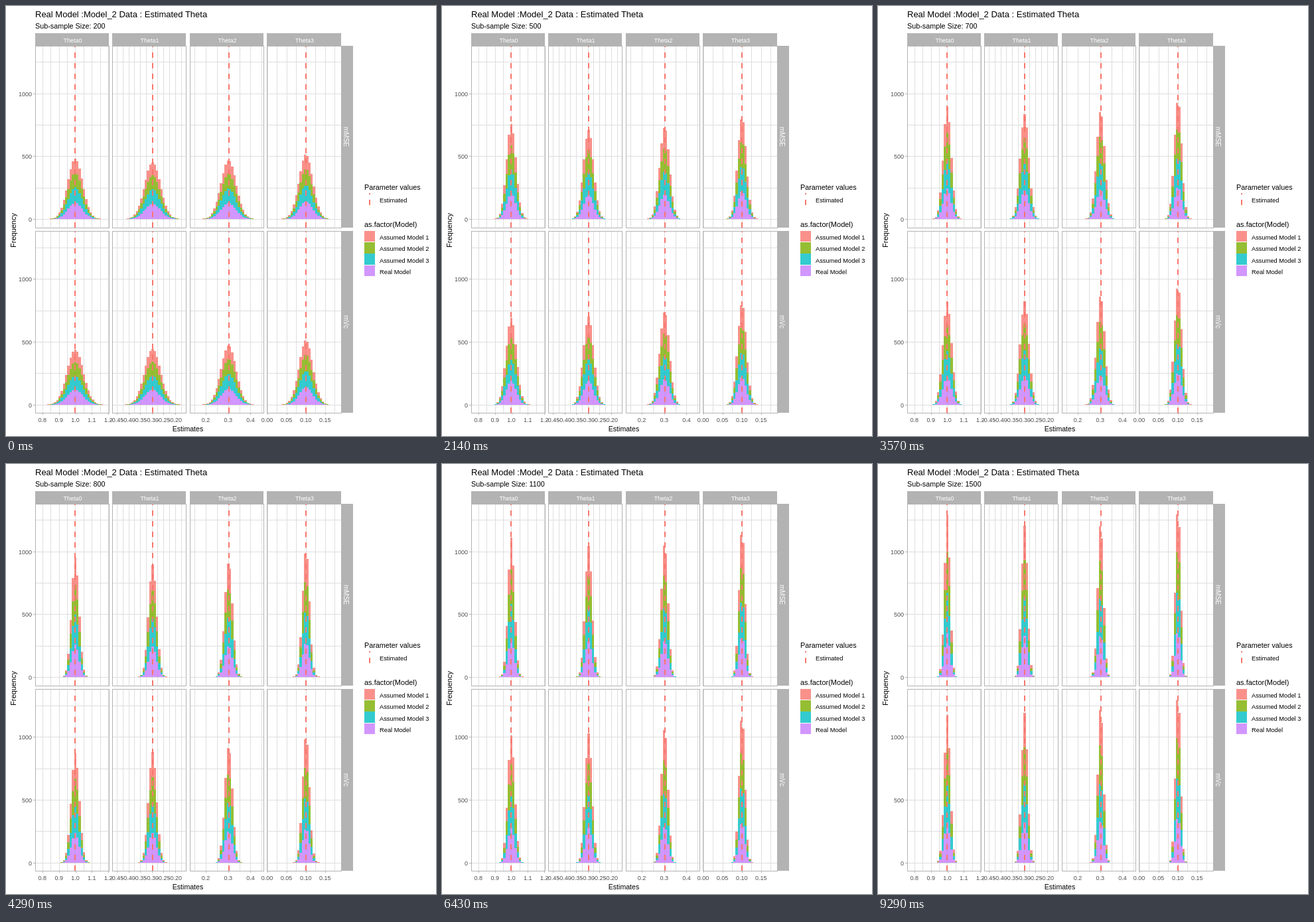
An HTML page that plays this animation: 648x648 px, repeating every 10000 ms.

```html
<!DOCTYPE html>
<html lang="en">
<head>
<meta charset="utf-8">
<title>Estimated Theta</title>
<style>
  html, body { margin: 0; width: 100%; height: 100%; overflow: hidden; background: #fff; }
  svg { display: block; width: 648px; height: 648px; font-family: "Liberation Sans", Arial, sans-serif; }
  rect, line { shape-rendering: crispEdges; }
</style>
</head>
<body>
<svg id="stage" viewBox="0 0 648 648"></svg>
<script>
const LOOP = 10000, STEPS = 14, SAMPLES = 4000;
const BIN = 3.36, UNIT = 0.1893;
const GREY = '#b3b3b3', GRID = '#dedede', LABEL = '#4d4d4d', RED = '#f8766d';
const MODELS = [
  ['Assumed Model 1', RED],
  ['Assumed Model 2', '#7cae00'],
  ['Assumed Model 3', '#00bfc4'],
  ['Real Model', '#c77cff'],
];
const ROWS = [
  { name: 'mMSE', top: 60, bottom: 334, zero: 321.5 },
  { name: 'mVc', top: 339, bottom: 613, zero: 601.05 },
];

// first, gap: pixel position and spacing of the tick labels; from, by: their values.
// edge: any bin edge; spread: sigma * sqrt(sample size), in pixels, for each row.
const PANELS = [
  { first: 54.8, gap: 24.85, from: 0.8, by: 0.1, labels: 5, digits: 1, line: 104, edge: 103, mean: 104.8, spread: [157, 172] },
  { first: 167, gap: 17.55, from: -0.45, by: 0.05, labels: 6, digits: 2, line: 221, edge: 219.7, mean: 221.4, spread: [168, 170] },
  { first: 301, gap: 33.7, from: 0.2, by: 0.1, labels: 3, digits: 1, line: 336, edge: 333, mean: 335.9, spread: [162, 160] },
  { first: 393.5, gap: 29.1, from: 0, by: 0.05, labels: 4, digits: 2, line: 452, edge: 449.5, mean: 452.5, spread: [147, 147] },
];
PANELS.forEach((panel, i) => {
  const left = 44 + 116.57 * i;
  panel.left = Math.floor(left);
  panel.right = Math.floor(left + 111.3);
});

function add(parent, tag, attrs = {}, text = '') {
  const node = document.createElementNS('http://www.w3.org/2000/svg', tag);
  for (const key in attrs) node.setAttribute(key, attrs[key]);
  node.textContent = text;
  parent.appendChild(node);
  return node;
}
const rect = (parent, x, y, width, height, fill, more) =>
  add(parent, 'rect', { x, y, width, height, fill, ...more });
const label = (text, x, y, size, fill = '#000', anchor = 'start', more) =>
  add(front, 'text', { x, y, 'font-size': size, fill, 'text-anchor': anchor, ...more }, text);
const turned = (text, x, y, size, fill, angle) =>
  label(text, 0, 0, size, fill, 'middle', { transform: `translate(${x} ${y}) rotate(${angle})` });
const dashes = (x, bottom, top) =>
  add(front, 'line', { x1: x, x2: x, y1: bottom, y2: top, stroke: RED, 'stroke-width': 2, 'stroke-dasharray': '8 8' });

const stage = document.getElementById('stage');
const back = add(stage, 'g');
const bars = add(stage, 'g', { 'fill-opacity': 0.8 });
const front = add(stage, 'g');

function drawPanel({ left, right, first, gap, line }, { top, bottom, zero }) {
  const width = right - left, height = bottom - top;
  for (let x = first - gap / 2; x < right; x += gap / 2)
    if (x > left) rect(back, Math.round(x), top, 1, height, GRID);
  for (let value = 0; value <= 1250; value += 250)
    rect(back, left, Math.floor(zero - value * UNIT), width, 1, GRID);
  dashes(line, bottom, top);
  rect(front, left + 0.5, top + 0.5, width, height - 0.5, 'none', { stroke: GREY });
}

function drawChart() {
  label('Real Model :Model_2 Data : Estimated Theta', 44, 17, 13);
  label('Estimates', 274, 641, 10.6, '#000', 'middle');
  turned('Frequency', 15, 338, 11, '#000', -90);

  PANELS.forEach((panel, i) => {
    const { left, right, first, gap, from, by, labels, digits } = panel;
    rect(front, left, 41, right - left, 19, GREY);
    label('Theta' + i, (left + right) / 2 + 1, 55, 9, '#fff', 'middle');
    ROWS.forEach(row => drawPanel(panel, row));
    for (let k = 0; k < labels; k++) {
      const x = first + k * gap;
      rect(front, Math.round(x), 613, 1, 3, GREY);
      label((from + k * by).toFixed(digits), x, 627, 9, LABEL, 'middle');
    }
  });

  for (const { name, top, bottom, zero } of ROWS) {
    rect(front, 505, top, 18, bottom - top, GREY);
    turned(name, 508.5, (top + bottom) / 2, 10, '#fff', 90);
    for (const value of [0, 500, 1000]) {
      const y = Math.floor(zero - value * UNIT);
      rect(front, 41, y, 3, 1, GREY);
      label(value, 39, y + 4, 9, LABEL, 'end');
    }
  }
}

function drawLegend() {
  label('Parameter values', 540, 277, 10.8);
  dashes(548, 300, 282);
  label('Estimated', 563, 296, 9.3);
  label('as.factor(Model)', 540, 333, 11);
  MODELS.forEach(([name, fill], i) => {
    const y = 339.2 + 17.28 * i, top = Math.floor(y);
    rect(front, 540, top, 16, Math.round(y + 16.2) - top, fill, { 'fill-opacity': 0.8 });
    label(name, 563, Math.round(y + 12.8), 9.3);
  });
}

// Logistic form of the normal distribution function
const normal = z => 1 / (1 + Math.exp(-1.5976 * z - 0.07056 * z ** 3));

function drawHistogram({ edge, mean, spread }, rowIndex, size) {
  const sigma = spread[rowIndex] / Math.sqrt(size);
  const base = Math.floor(ROWS[rowIndex].zero);
  for (let k = -14; k < 16; k++) {
    const x = edge + k * BIN;
    const z = (x - mean) / sigma, step = BIN / sigma;
    const count = SAMPLES * (normal(z + step) - normal(z));
    if (count < 1.5) continue;
    const left = Math.floor(x), width = Math.floor(x + BIN) - left;
    const lift = 0.022 * Math.exp(-((z + step / 2) ** 2));
    let bottom = base;
    for (let m = 3; m >= 0; m--) {
      const share = (4 - m) / 4 + (m ? lift : 0);
      const height = Math.round(share * count * UNIT);
      const top = base - (m ? height : Math.max(1, height));
      if (top < bottom) rect(bars, left, top, width, bottom - top, MODELS[m][1]);
      bottom = top;
    }
  }
}

drawChart();
drawLegend();
const subtitle = label('', 44, 34, 10.8);
let shown = -1;

function tick() {
  const time = performance.now() % LOOP;
  let step = 0;
  while (step < STEPS - 1 && time >= Math.round((step + 1) * 1000 / STEPS) * 10) step++;
  if (step !== shown) {
    shown = step;
    const size = 200 + step * 100;
    subtitle.textContent = 'Sub-sample Size: ' + size;
    bars.replaceChildren();
    for (const panel of PANELS) ROWS.forEach((_, i) => drawHistogram(panel, i, size));
  }
  requestAnimationFrame(tick);
}
tick();
</script>
</body>
</html>
```
